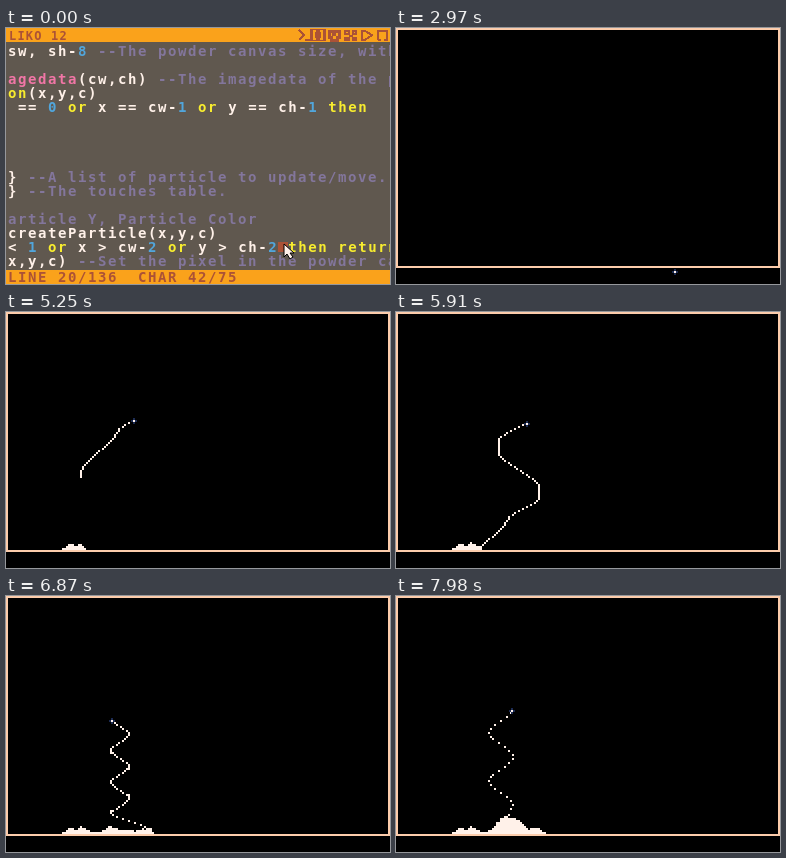
Recreate the animation shown at these times as an HTML page with a canvas. Size 384 by 256 pixels, loop 8000 ms.

```html
<!DOCTYPE html>
<html lang="en">
<head>
<meta charset="utf-8">
<title>Powder</title>
<style>
  html, body { margin: 0; width: 100%; height: 100%; overflow: hidden; background: #000; }
  svg, canvas { position: absolute; left: 0; top: 0; width: 384px; height: 256px; }
  text {
    font: bold 14px "DejaVu Sans Mono", monospace;
    letter-spacing: 1.572px;
    white-space: pre;
    fill: #fff1e9;
  }
  .keyword { fill: #f7ec2f; }
  .number { fill: #51a6dc; }
  .comment { fill: #83769c; }
  .call { fill: #f176a6; }
  .bar, .caret { fill: #ab5236; }
  .title { font-size: 12px; letter-spacing: 1.2px; }
</style>
</head>
<body>
<svg id="editor" viewBox="0 0 384 256">
  <rect width="384" height="256" fill="#60584f"/>
  <g id="code"></g>
  <path d="M0 0H384V14H0ZM0 242H384V256H0Z" fill="#faa21b"/>
  <text class="bar title" x="3" y="12">LIKO 12</text>
  <text class="bar" x="2" y="254">LINE 20/136  CHAR 42/75</text>
  <g fill="none" stroke="#ab5236" stroke-width="2" shape-rendering="crispEdges">
    <path d="M293 2L298 7L293 12M299 12H304"/>
    <path d="M304 1H320V13H304Z" fill="#ab5236" stroke="none"/>
    <path d="M310 3H308V11H310M314 3H316V11H314" stroke="#faa21b"/>
    <path d="M323 3H333V9H331V12H325V9H323ZM326 6H330" stroke-width="3"/>
    <path d="M339 3H343V6H339ZM347 3H350V6H347ZM339 10H343V12H339ZM347 10H350V12H347ZM343 8H347"/>
    <path d="M356 3H359L366 7L359 12H356Z"/>
    <path d="M372 12V3H381V12H378M372 12H375"/>
  </g>
  <rect id="editCaret" class="caret" x="272" y="214" width="10" height="10"/>
  <path d="M278 216V229L281 226L284 231L287 229L284 225H288Z" fill="#fff1e9" stroke="#000"/>
</svg>
<svg id="terminal" viewBox="0 0 384 256">
  <rect width="384" height="256"/>
  <text id="prompt" x="2" y="12"></text>
  <rect id="shellCaret" class="caret" y="2" width="10" height="10"/>
</svg>
<canvas id="powder" width="384" height="256"></canvas>
<script>
const LOOP = 8000, SHELL = 870, ENTER = 2160, RUN = 2280;
const $ = id => document.getElementById(id);
const show = (id, on) => { $(id).style.visibility = on ? "visible" : "hidden"; };
const blink = (t, start, period) => Math.floor((t - start) / period) % 2 === 0;

// Markup: k keyword, n number, c comment, f call
const code = `sw, sh-{n:8} {c:--The powder canvas size, with}

{f:agedata}(cw,ch) {c:--The imagedata of the p}
{k:on}(x,y,c)
 == {n:0} {k:or} x == cw-{n:1} {k:or} y == ch-{n:1} {k:then}




} {c:--A list of particle to update/move.}
} {c:--The touches table.}

{c:article Y, Particle Color}
createParticle(x,y,c)
< {n:1} {k:or} x > cw-{n:2} {k:or} y > ch-{n:2} {k:then return}
x,y,c) {c:--Set the pixel in the powder ca}`;
const classes = { k: "keyword", n: "number", c: "comment", f: "call" };
$("code").innerHTML = code.split("\n").map((line, row) => {
  const body = line.replace(/</g, "&lt;")
    .replace(/\{(\w):([^}]*)\}/g, (_, c, s) => `<tspan class="${classes[c]}">${s}</tspan>`);
  return `<text x="2" y="${28 + 14 * row}">${body}</text>`;
}).join("");

// Hand movement: eased key points [time, position], then two steady swings
const keysX = [
  [2970, 279], [3615, 62], [3730, 62], [3900, 75], [4870, 75], [5175, 112], [5325, 143],
  [5438, 143], [5678, 103], [5783, 103], [5970, 142], [6085, 105]
];
const keysY = [
  [2970, 244], [3615, 70], [3730, 70], [4050, 156], [4820, 108],
  [5910, 112], [6870, 125], [7240, 111], [7980, 115]
];

function sample(keys, t) {
  const i = keys.findIndex(k => k[0] > t);
  if (i < 0) return keys[keys.length - 1][1];
  const [t0, a] = keys[i - 1], [t1, b] = keys[i];
  const u = (t - t0) / (t1 - t0);
  const smooth = (1 - Math.cos(Math.PI * u)) / 2;
  return a + (b - a) * (u + smooth) / 2;
}

const swing = (t, mid, reach, peak, period) =>
  mid + reach * Math.cos(2 * Math.PI * (t - peak) / period);

function hand(t) {
  const x = t < 6085 ? sample(keysX, t)
    : t < 7165 ? swing(t, 114, 9, 6220, 270)
    : swing(t, 105, 12, 7240, 380);
  return [x, sample(keysY, t)];
}

// Falling powder: one cell per tick; strokes are [from, to, ticks per grain]
const W = 192, FLOOR = 119, TICK = 15, START = 3615;
const strokes = [[START, 4060, 1], [4820, 7200, 1], [7200, LOOP, 2]];
let grid, ticks;

function reset() {
  grid = new Uint8Array(W * (FLOOR + 1)).fill(1, W * FLOOR);
  ticks = -1;
}

function step() {
  ticks++;
  for (let at = W * FLOOR - 1; at > W; at--) {
    if (!grid[at]) continue;
    const side = (ticks + at) % 2 ? 1 : -1;
    const next = [at + W, at + W + side, at + W - side].find(i => !grid[i]);
    if (next === undefined) continue;
    grid[at] = 0;
    grid[next] = 1;
  }
  const t = START + ticks * TICK;
  if (strokes.some(([from, to, gap]) => t >= from && t < to && ticks % gap === 0)) {
    const [x, y] = hand(t);
    grid[(y >> 1) * W + (x >> 1)] = 1;
  }
}

const ctx = $("powder").getContext("2d");
function box(color, x, y, w = 2, h = 2) {
  ctx.fillStyle = color;
  ctx.fillRect(x, y, w, h);
}

function drawPowder(t) {
  const target = Math.floor((t - START) / TICK);
  if (target < ticks) reset();
  while (ticks < target) step();

  box("#000", 0, 0, 384, 256);
  box("#fcccab", 0, 0, 384, 240);
  box("#000", 2, 2, 380, 236);
  for (let i = 0; i < W * FLOOR; i++) {
    if (grid[i]) box("#fff1e9", i % W * 2, Math.floor(i / W) * 2);
  }
  if (t < 2970) return;
  const [x, y] = hand(t).map(v => Math.round(v) - 1);
  box("#1c2b53", x - 2, y, 6, 2);
  box("#1c2b53", x, y - 2, 2, 6);
  box("#fff1e9", x, y);
}

function drawShell(t) {
  const typed = "run".slice(0, [1470, 1770, 2010].filter(key => key <= t).length);
  $("prompt").textContent = "D:/> " + typed;
  $("shellCaret").setAttribute("x", 52 + 10 * typed.length);
}

function frame(now) {
  const t = now % LOOP;
  const shell = t >= SHELL && t < RUN;
  show("editor", t < SHELL);
  show("editCaret", t < SHELL && blink(t, -390, 450));
  show("terminal", shell);
  show("shellCaret", shell && t < ENTER && blink(t, 850, 440));
  show("powder", t >= RUN);
  if (shell) drawShell(t);
  if (t >= RUN) drawPowder(t);
  requestAnimationFrame(() => frame(performance.now() - origin));
}

reset();
const origin = performance.now();
frame(0);
</script>
</body>
</html>
```
